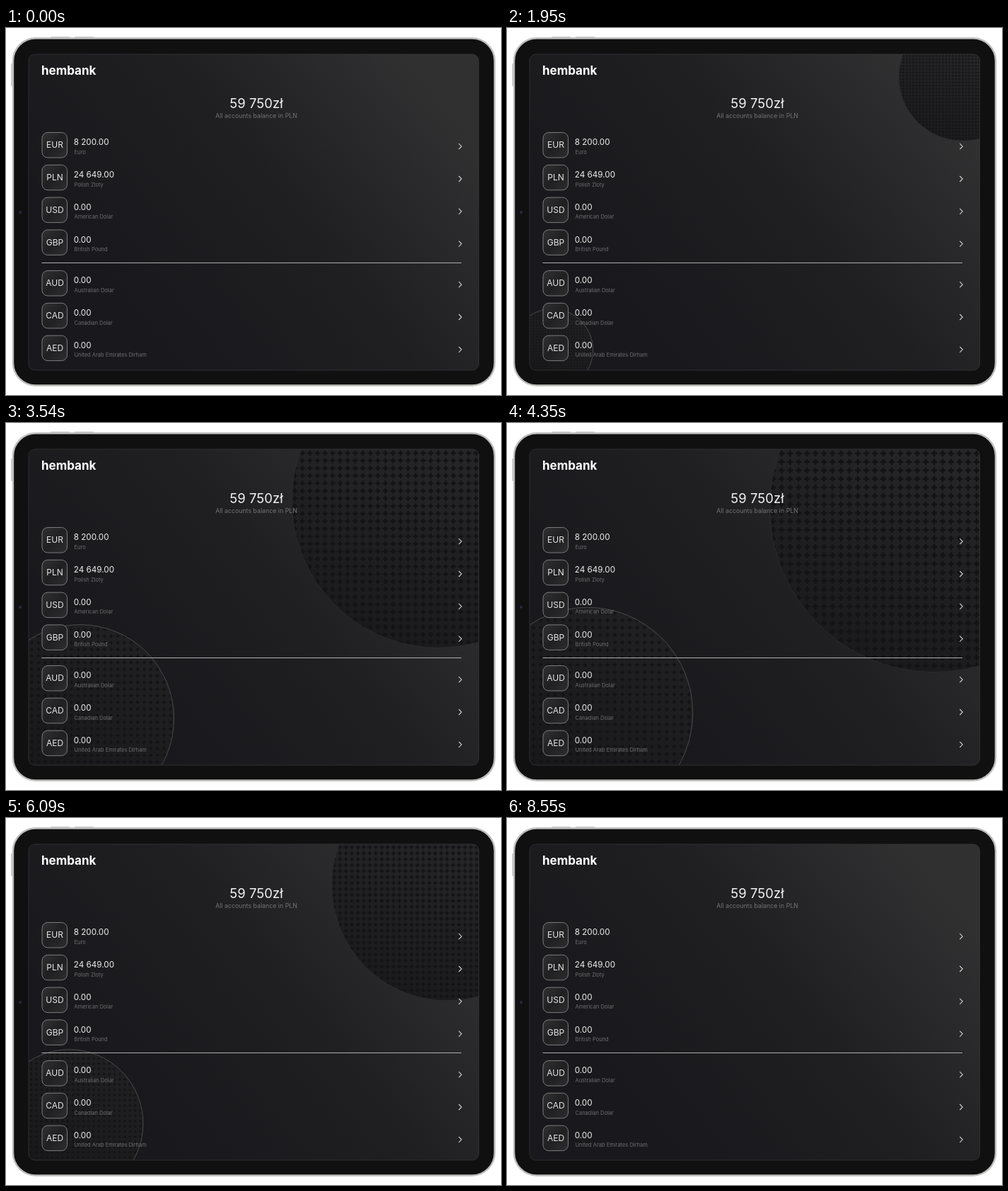
Recreate the animation shown at these times as an HTML page. Size 700x518 px, loop 8.91 s.

```html
<!DOCTYPE html>
<html lang="en">
<head>
<meta charset="utf-8">
<title>Account balances</title>
<style>
  html, body { margin: 0; width: 100%; height: 100%; overflow: hidden; background: #fff; }
  svg { display: block; width: 700px; height: 518px; font-family: Inter, "Open Sans", sans-serif; }
  .brand { font-size: 17px; font-weight: 700; fill: #fff; }
  .total { font-size: 18.5px; fill: #f2f2f2; text-anchor: middle; }
  .caption { font-size: 8.8px; fill: #737375; text-anchor: middle; }
  .code { font-size: 12px; fill: #e6e6e6; text-anchor: middle; }
  .amount { font-size: 11.7px; fill: #f0f0f0; }
  .label { font-size: 7.5px; fill: #6e6e70; }
</style>
</head>
<body>
<svg viewBox="0 0 700 518">
  <defs>
    <linearGradient id="screenFill" x1="0.2" y1="0.75" x2="1" y2="0.3">
      <stop offset="0" stop-color="#19191d"/>
      <stop offset="0.5" stop-color="#1f1f22"/>
      <stop offset="1" stop-color="#303031"/>
    </linearGradient>
    <linearGradient id="discFill" x1="0.7" y1="0" x2="0.3" y2="1">
      <stop offset="0.1" stop-color="#2a2a2c"/>
      <stop offset="1" stop-color="#1a1a1d"/>
    </linearGradient>
    <linearGradient id="smallDiscFill" x1="0" y1="1" x2="0.8" y2="0">
      <stop offset="0" stop-color="#151517"/>
      <stop offset="1" stop-color="#212124"/>
    </linearGradient>
    <linearGradient id="tileFill" x1="0" y1="0" x2="1" y2="1">
      <stop offset="0" stop-color="#313133"/>
      <stop offset="0.5" stop-color="#202022"/>
      <stop offset="1" stop-color="#2e2e30"/>
    </linearGradient>
    <pattern id="bigDots" width="12" height="12" patternUnits="userSpaceOnUse">
      <path d="M3 6H9M6 3V9" stroke="#131315" stroke-width="3" stroke-linecap="round"/>
    </pattern>
    <pattern id="smallDots" width="10.5" height="10.5" patternUnits="userSpaceOnUse">
      <path d="M3.2 5.2H7.2M5.2 3.2V7.2" stroke="#131315" stroke-width="2.2" stroke-linecap="round"/>
    </pattern>
    <clipPath id="screenClip"><rect x="32" y="37" width="636.5" height="446" rx="9"/></clipPath>
  </defs>

  <g fill="#d0d0d0">
    <rect x="63" y="12" width="27" height="4" rx="1"/>
    <rect x="97" y="12" width="27" height="4" rx="1"/>
    <rect x="7" y="50" width="4" height="32" rx="1"/>
  </g>
  <rect x="10" y="14.5" width="681" height="490" rx="32" fill="#101011" stroke="#bdbdbb" stroke-width="2.4"/>
  <circle cx="20" cy="260" r="2.6" fill="#1b1b22"/>
  <circle cx="20" cy="260" r="1.1" fill="#3b3b58"/>

  <g clip-path="url(#screenClip)">
    <rect x="32" y="37" width="637" height="446" fill="url(#screenFill)"/>
    <g id="bigDisc">
      <circle cx="-66" cy="82" r="233" fill="url(#discFill)"/>
      <circle cx="-66" cy="82" r="233" fill="url(#bigDots)" stroke="#303032" stroke-width="0.7" vector-effect="non-scaling-stroke"/>
    </g>
    <g id="smallDisc">
      <circle cx="82" cy="-74" r="149" fill="url(#smallDiscFill)"/>
      <circle cx="82" cy="-74" r="149" fill="url(#smallDots)" stroke="#565658" stroke-width="0.8" vector-effect="non-scaling-stroke"/>
    </g>
  </g>
  <rect x="32" y="37" width="636.5" height="446" rx="9" fill="none" stroke="#363638" stroke-width="0.8"/>

  <text class="brand" x="50" y="65.5">hembank</text>
  <text class="total" x="354" y="113">59 750zł</text>
  <text class="caption" x="354" y="127">All accounts balance in PLN</text>
  <path d="M50.5 331.5H644" stroke="#aeaeae"/>
  <g id="rows"></g>
</svg>
<script>
const LOOP = 8910, STEP = 30;
const START = 510, PEAK = 4440, END = 8550;

const accounts = [
  ["EUR", "8 200.00", "Euro"],
  ["PLN", "24 649.00", "Polish Zloty"],
  ["USD", "0.00", "American Dolar"],
  ["GBP", "0.00", "British Pound"],
  ["AUD", "0.00", "Australian Dolar"],
  ["CAD", "0.00", "Canadian Dolar"],
  ["AED", "0.00", "United Arab Emirates Dirham"]
];

const rowMarkup = ([code, amount, label], i) => {
  const y = 147 + i * 45.8 + (i > 3 ? 11.8 : 0);
  return `<g transform="translate(0 ${y})">
    <rect x="51" y="0.5" width="35.5" height="35.5" rx="8" fill="url(#tileFill)" stroke="#858587" stroke-width="0.9"/>
    <text class="code" x="69" y="22.2">${code}</text>
    <text class="amount" x="95.7" y="18.2">${amount}</text>
    <text class="label" x="96.5" y="30.8">${label}</text>
    <path d="M640.3 16.2L644.2 20.2L640.3 24.2" fill="none" stroke="#d2d2d2" stroke-width="1.1"/>
  </g>`;
};
document.getElementById("rows").innerHTML = accounts.map(rowMarkup).join("");

// Soft start, full stop at the peak
const ease = x => x * x * (3 - 2 * x) + 0.57 * x * (1 - x) ** 2;

function discScale(t) {
  if (t <= START || t >= END) return 0;
  return ease(t < PEAK ? (t - START) / (PEAK - START) : (END - t) / (END - PEAK));
}

function place(id, x, y, scale) {
  const disc = document.getElementById(id);
  disc.setAttribute("visibility", scale > 0 ? "visible" : "hidden");
  disc.setAttribute("transform", `translate(${x} ${y}) scale(${Math.max(scale, 0.001)})`);
}

function draw(t) {
  const scale = discScale(t);
  place("bigDisc", 670, 37, scale);
  place("smallDisc", 32, 483, scale);
}

const origin = performance.now();
function tick() {
  const t = (performance.now() - origin) % LOOP;
  draw(Math.floor(t / STEP) * STEP);
  requestAnimationFrame(tick);
}
draw(0);
requestAnimationFrame(tick);
</script>
</body>
</html>
```
